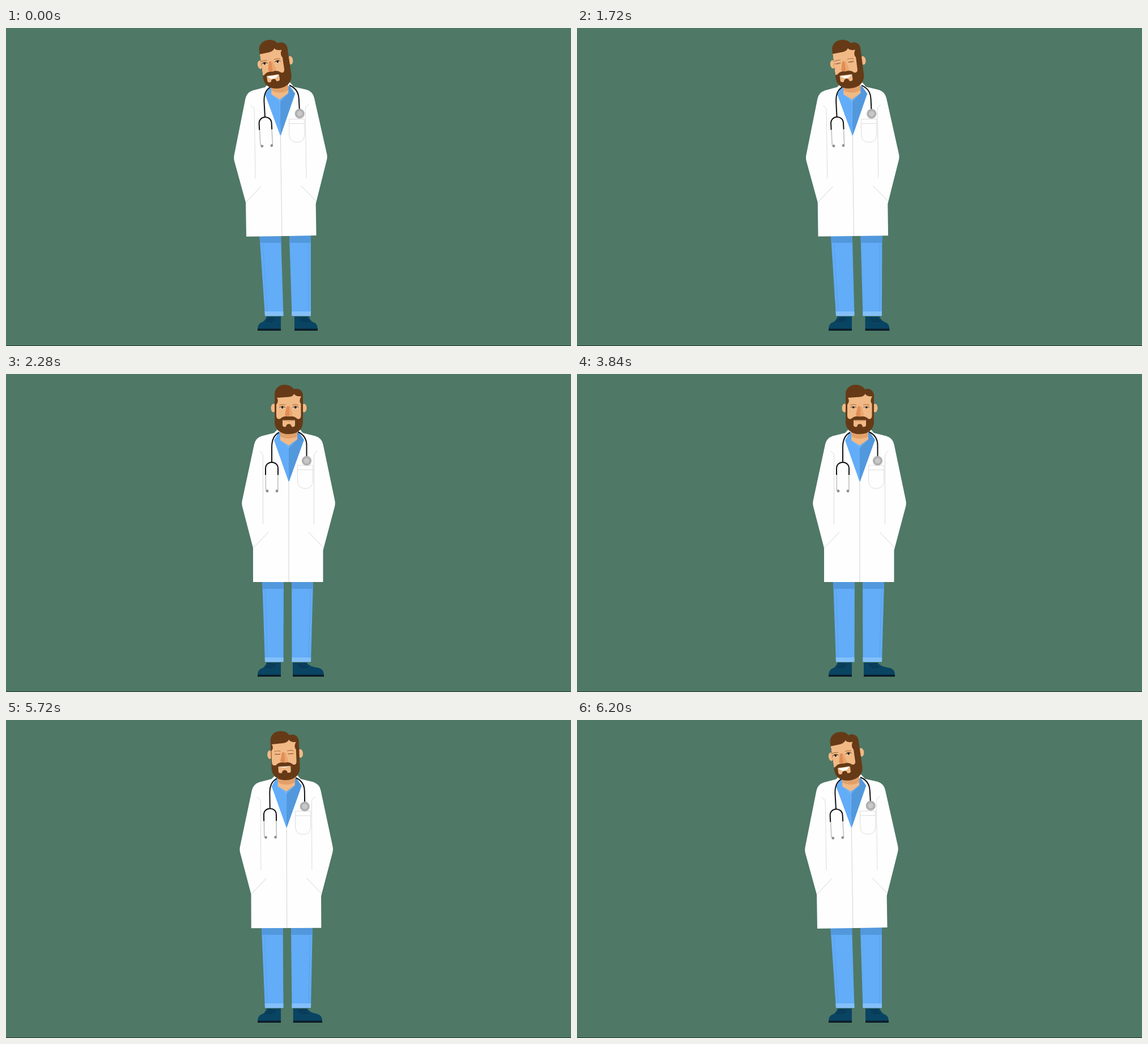
An HTML page that plays this animation: 997x561 px, repeating every 7000 ms.

```html
<!DOCTYPE html>
<html lang="en">
<head>
<meta charset="utf-8">
<title>Doctor</title>
<style>
  html, body { margin: 0; width: 100%; height: 100%; overflow: hidden; background: #4f7866; }
  svg { display: block; width: 100%; height: 100%; }
  .line { fill: none; stroke: #d9d9d9; stroke-width: .9; }
  .tube { fill: none; stroke: #111; stroke-width: 2; }
  .metal { fill: none; stroke: #c4c4c4; stroke-width: 1.7; }
  .skin { fill: #f1b985; }
  .hair { fill: #663a16; }
  .scrubs { fill: #62acf8; }
  .shade { fill: #5298dd; }
  .cuff { fill: #83bff9; }
  .seam { fill: none; stroke: #579fe8; stroke-width: .8; }
  .lace { fill: none; stroke: #0a2d45; stroke-width: 1; }
</style>
</head>
<body>
<svg viewBox="0 0 997 561">
  <defs>
    <path id="headShape" d="M474 84V36C474 25 482 19 492 19C499 19 505 22 508 27C514 24 524 28 524 38V84C524 98 514 106 499 106C484 106 474 98 474 84Z"/>
    <clipPath id="headClip"><use href="#headShape"/></clipPath>
    <g id="eye">
      <ellipse rx="4.6" ry="2.3" fill="#fbe6d2"/>
      <circle r="2.1" fill="#2b1a10"/>
      <path d="M-5 .3Q0 -4.4 5 .3" fill="none" stroke="#5a3517" stroke-width="1.1"/>
    </g>
  </defs>

  <rect width="997" height="561" fill="#4f7866"/>
  <rect y="560" width="997" height="1" fill="#24372f"/>

  <g id="leftShoe"></g>
  <g id="rightShoe"></g>

  <g id="leftLeg">
    <path class="scrubs" d="M452 360H490L489.5 508H457Z"/>
    <path class="shade" d="M452 360H490V379H452.6Z"/>
    <path class="cuff" d="M456.7 500H489.5V508H457Z"/>
    <path class="seam" d="M457.5 380L461 500"/>
  </g>
  <g id="rightLeg">
    <path class="scrubs" d="M504 360H542.2L538 508H504.5Z"/>
    <path class="shade" d="M504 360H542.2L541.7 379H504.1Z"/>
    <path class="cuff" d="M504.5 500H538.2L538 508H504.5Z"/>
    <path class="seam" d="M537.5 380L534 500"/>
  </g>

  <g id="coat">
    <path fill="#fefefe" d="M481 96H517L524 104L546 109.500Q557 113 559.500 124L580 222Q581.500 228 580 234L559.500 311V367H436V307L417 234Q415.500 228 417 222L438 124Q440.500 113 451 109.500L473 104Z"/>
    <path class="scrubs" d="M481 103L473 117L499 191V103Z"/>
    <path class="shade" d="M499 103V191L526 116L517 103Z"/>
    <path class="cuff" d="M484 103V117L499 131L514 116V103Z" fill-opacity=".45"/>
    <path class="skin" d="M484 95H514V115L499 126L484 117Z"/>
    <path fill="#e2a06a" d="M484 100H514V110Q499 118 484 110Z"/>
    <g class="line">
      <path d="M499 191V367" stroke="#cfcfcf"/>
      <path d="M447 136Q453.500 138 453.500 146V265M549.500 136Q543.500 138 543.500 146V265"/>
      <path d="M463 279L437 306M534 279L560 306" stroke="#cfcfcf"/>
      <path d="M514.500 161H541.500V188Q541.500 202 528 202Q514.500 202 514.500 188ZM514.500 169H541.500"/>
    </g>
  </g>

  <g id="stethoscope">
    <path class="tube" d="M482 103C472 108 469 118 469 129V156M515 102C526 107 530.500 115 530.500 126V147"/>
    <path class="tube" d="M458 178V167C458 152 480 152 480 167V178"/>
    <path class="metal" d="M458.300 178V203Q458.300 206 461 206.500M479.800 178V203Q479.800 206 478 206.500"/>
    <g fill="#8e8e8e"><circle cx="461" cy="206.500" r="2.400"/><circle cx="478" cy="206.500" r="2.400"/></g>
    <circle cx="530.500" cy="153" r="8.600" fill="#b0b0b0"/>
    <circle cx="530.500" cy="153" r="4.800" fill="#c8c8c8"/>
  </g>

  <g id="head">
    <g class="skin"><ellipse cx="472" cy="60" rx="4.500" ry="7.500"/><ellipse cx="526" cy="60" rx="4.500" ry="7.500"/></g>
    <use href="#headShape" class="hair"/>
    <g clip-path="url(#headClip)">
      <g id="face">
        <path class="skin" d="M478 42L499 40.500Q506 40 508.500 35Q511 40 521 39.500Q516 47 520.500 53V74Q520 81 514 79Q508 73 499 75Q490 73 484 79Q477.500 81 477 74V54Q482 48 478 42Z"/>
        <path fill="#e18d55" d="M495.500 57H500V75Q494 75 492 72Z"/>
        <path fill="#eaa76e" d="M500 57H502L506 72Q504 75 500 75Z"/>
        <path class="skin" d="M488 81.500H510V90Q510 94 504 93L503 90Q499 86 495 90L494 93Q488 94 488 90Z"/>
        <path d="M490 82.500Q499 84.500 508 82.500" fill="none" stroke="#dd9564"/>
        <path id="smile" fill="#fff"/>
        <path d="M482 55Q487 52.800 493 54.500M505 54.500Q511 52.800 516 55" fill="none" stroke="#a4693b" stroke-width="1"/>
        <path d="M483 59.500Q488 60.500 492.500 59.500M506 59.500Q511 60.500 515.500 59.500" fill="none" stroke="#794820"/>
        <use id="leftEye" href="#eye"/>
        <use id="rightEye" href="#eye"/>
      </g>
    </g>
  </g>
</svg>
<script>
const LOOP = 7000, STEP = 40, TURN = 720;
const TURN_IN = 1400, TURN_BACK = 5320;
// Each blink: starts closing, closed, starts opening, open
const BLINKS = [[320, 540, 560, 760], [1480, 1740, 2040, 2280], [3800, 3940, 3980, 4120], [5400, 5660, 5960, 6200]];

const $ = id => document.getElementById(id);
const clamp = v => Math.max(0, Math.min(1, v));
const move = (id, value) => $(id).setAttribute('transform', value);

// Cubic Bezier easing (.95, 0, .41, 1)
function ease(x) {
  let low = 0, high = 1, s = .5;
  for (let i = 0; i < 20; i++) {
    s = (low + high) / 2;
    const bx = 3 * (1 - s) ** 2 * s * .95 + 3 * (1 - s) * s * s * .41 + s ** 3;
    if (bx < x) low = s; else high = s;
  }
  return s * s * (3 - 2 * s);
}

function shoe(width) {
  return `<path fill="#094463" d="M0 0H25Q28 7 ${width - 9} 9.500Q${width} 12 ${width} 22H0Z"/>
    <path fill="#0c1d29" d="M0 21.500H${width}V25H0Z"/>
    <path class="lace" d="M9 3.500L22 2.500M10 6.500L24 5.500M14 9.500L27 8"/>`;
}

function eyeOpenness(t) {
  return Math.min(...BLINKS.map(([close, shut, open, end]) =>
    Math.max(clamp((shut - t) / (shut - close)), clamp((t - open) / (end - open)))));
}

function draw(t) {
  const lean = 1 - ease(clamp((t - TURN_IN) / TURN)) + ease(clamp((t - TURN_BACK) / TURN));
  const open = eyeOpenness(t);

  move('leftLeg', `translate(0 508) skewX(${1.95 * lean}) translate(0 -508)`);
  move('rightLeg', `translate(0 508) skewX(${1.65 * lean}) translate(0 -508)`);
  move('rightShoe', `translate(${506 + 3 * lean} 509)`);
  $('rightShoe').innerHTML = shoe(55 - 14 * lean);

  move('coat', `translate(${-12 * lean}) rotate(${-.85 * lean} 499 367)`);
  move('stethoscope', `translate(${-15 * lean}) rotate(${-3.2 * lean} 497 103)`);
  move('head', `translate(${-17.3 * lean} ${.4 * lean}) rotate(${-8.4 * lean} 499 105)`);
  move('face', `translate(${-7.5 * lean})`);
  $('smile').setAttribute('d', `M489.500 81.500Q499 83.500 508.500 81.500Q506 ${82 + 6 * lean} 499 ${82.500 + 5 * lean}Q492 ${82 + 6 * lean} 489.500 81.500Z`);
  move('leftEye', `translate(487.600 59) scale(1 ${open})`);
  move('rightEye', `translate(510.800 59) scale(1 ${open})`);
}

$('leftShoe').innerHTML = shoe(41);
move('leftShoe', 'translate(485 509) scale(-1 1)');

function tick() {
  draw(Math.floor(performance.now() % LOOP / STEP) * STEP);
  requestAnimationFrame(tick);
}
tick();
</script>
</body>
</html>
```
